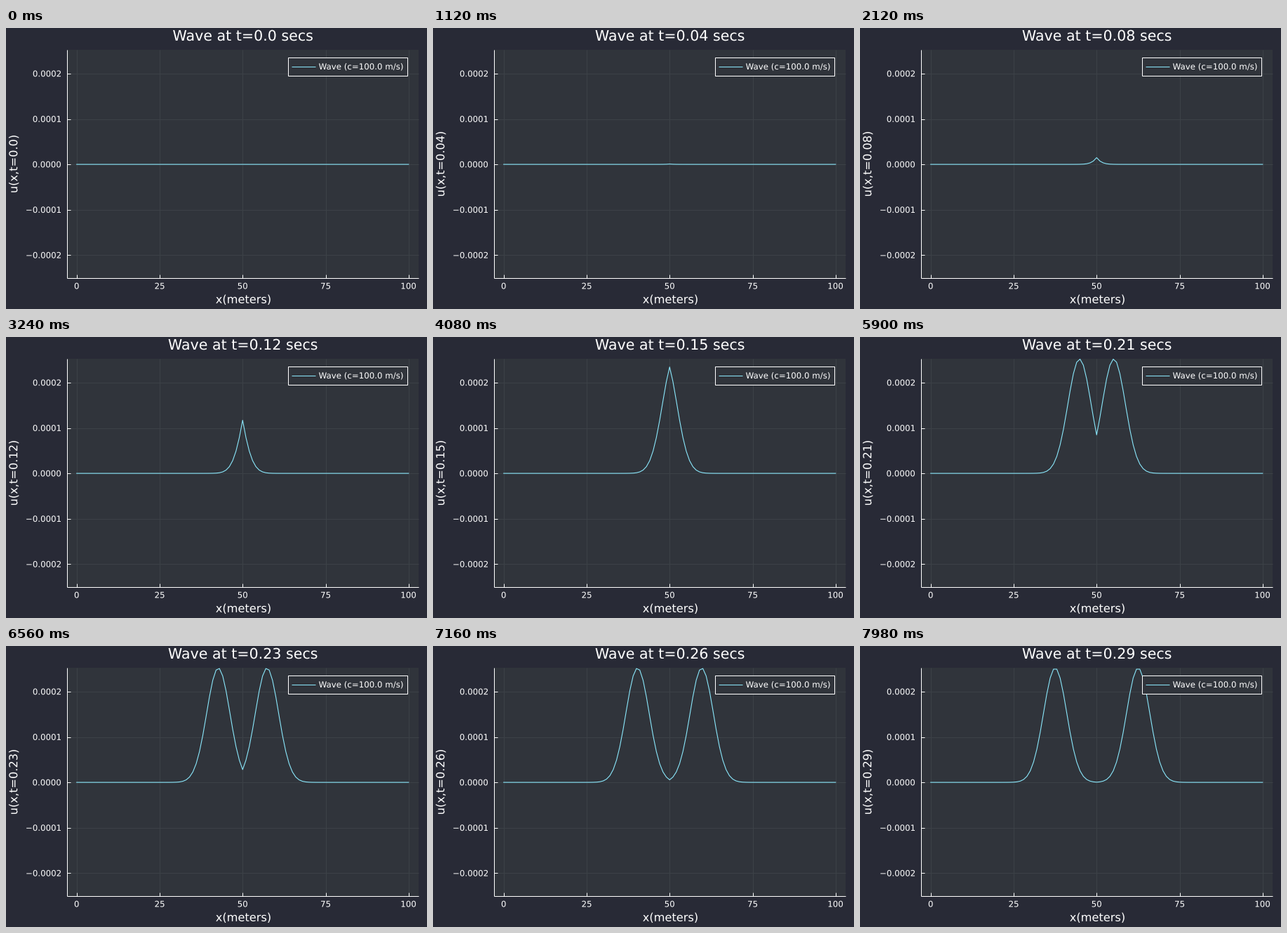
Recreate the animation shown at these times as a matplotlib script. Size 600 px wide and 400 px high, loop 8000 ms.

```python
import numpy as np
import matplotlib.pyplot as plt
from matplotlib.animation import FuncAnimation
from matplotlib.collections import LineCollection
from matplotlib.patches import PathPatch, Rectangle
from matplotlib.path import Path
from matplotlib.textpath import TextPath
from matplotlib.transforms import Affine2D

W, H, DPI = 600, 400, 100
BACK, PANEL, WHITE, GRID, CYAN = "#282a36", "#30343b", "#ffffff", "#3c4147", "#8be9fd"
LEFT, RIGHT, TOP, BOTTOM = 86.5, 588, 31, 355.5
PX = 72 / DPI  # one pixel in points
TICK, GUIDE, TITLE = 11.8, 16.2, 20.6

# a pulse leaving x = 50 both ways, in metres and seconds
SPEED, PEAK, SIGMA, DELAY, RATE = 100, 2.52e-4, 0.035, 0.16, 600

fig = plt.figure(figsize=(W / DPI, H / DPI), dpi=DPI, facecolor=BACK)
ax = fig.add_axes([0, 0, 1, 1])
ax.set_xlim(0, W)
ax.set_ylim(H, 0)
ax.axis("off")


def px(x):
    return 100.7 + 4.731 * x


def py(u):
    return 194.1 - 64.6e4 * u


def text_path(text, size, x, y, align=0.5, angle=0):
    """Outline of a text with its baseline at (x, y)."""
    path = TextPath((0, 0), text, size=size, prop={"family": "DejaVu Sans"})
    xs = path.vertices[path.codes != Path.CLOSEPOLY, 0]
    shift = -(xs.min() + align * np.ptp(xs))
    place = Affine2D().translate(shift, 0).rotate_deg(angle).scale(1, -1).translate(x, y)
    return Path(place.transform(path.vertices), path.codes)


def add_text(*paths):
    path = Path.make_compound_path(*paths)
    return ax.add_artist(PathPatch(path, fc=WHITE, lw=0, zorder=6))


def add_lines(segments, color, z):
    ax.add_artist(LineCollection(segments, colors=color, linewidths=PX, zorder=z))


panel = ax.add_artist(Rectangle((LEFT, TOP), RIGHT - LEFT, BOTTOM - TOP, fc=PANEL, lw=0))

grid = []
frame = [[(LEFT, TOP), (LEFT, BOTTOM)], [(LEFT, BOTTOM), (RIGHT, BOTTOM)]]
labels = [
    text_path("x(meters)", GUIDE, 338, 391.8),
    text_path("Wave (c=100.0 m/s)", TICK, 446, 59, align=0),
]
for value in (0, 25, 50, 75, 100):
    x = px(value)
    grid.append([(x, TOP), (x, BOTTOM)])
    frame.append([(x, BOTTOM), (x, BOTTOM - 5)])
    labels.append(text_path(str(value), TICK, x, 371.4))
for value in (-2, -1, 0, 1, 2):
    y = py(value * 1e-4)
    grid.append([(LEFT, y), (RIGHT, y)])
    frame.append([(LEFT, y), (LEFT + 5, y)])
    label = f"{value * 1e-4:.4f}".replace("-", "\u2212")
    labels.append(text_path(label, TICK, 78, y + 4.3, align=1))

add_lines(grid, GRID, 2)
add_lines(frame, WHITE, 3)
add_text(*labels)
ax.add_artist(Rectangle((401.5, 41.5), 170, 26, fc=PANEL, ec=WHITE, lw=PX, zorder=5))
add_lines([[(406.5, 54.5), (440.5, 54.5)]], CYAN, 6)

grid_x = np.arange(101)
wave, = ax.plot(px(grid_x), py(0 * grid_x), color=CYAN, lw=1.1 * PX, zorder=4)
wave.set_clip_path(panel)


def title_path(secs):
    return text_path(f"Wave at t={secs} secs", TITLE, 337.5, 18)


def guide_path(secs):
    return text_path(f"u(x,t={secs})", GUIDE, 16.2, 193.5, angle=90)


times = [k / 100 for k in range(30)]
title_paths = [title_path(t) for t in times]
guide_paths = [guide_path(t) for t in times]
title, guide = add_text(title_paths[0]), add_text(guide_paths[0])


def update(tick):
    # three uneven steps (20, 100, 20 ms) every 140 ms
    group, part = divmod(tick, 7)
    step = 3 * group + (part > 0) + (part > 5)

    delay = DELAY + np.abs(grid_x - 50) / SPEED
    u = PEAK * np.exp(-0.5 * ((step / RATE - delay) / SIGMA) ** 2)
    wave.set_ydata(py(u))

    hundredths = (step + 3) // 6
    title.set_path(title_paths[hundredths])
    guide.set_path(guide_paths[hundredths])
    return wave, title, guide


anim = FuncAnimation(fig, update, frames=400, interval=20, repeat=True, repeat_delay=0)
plt.show()
```
